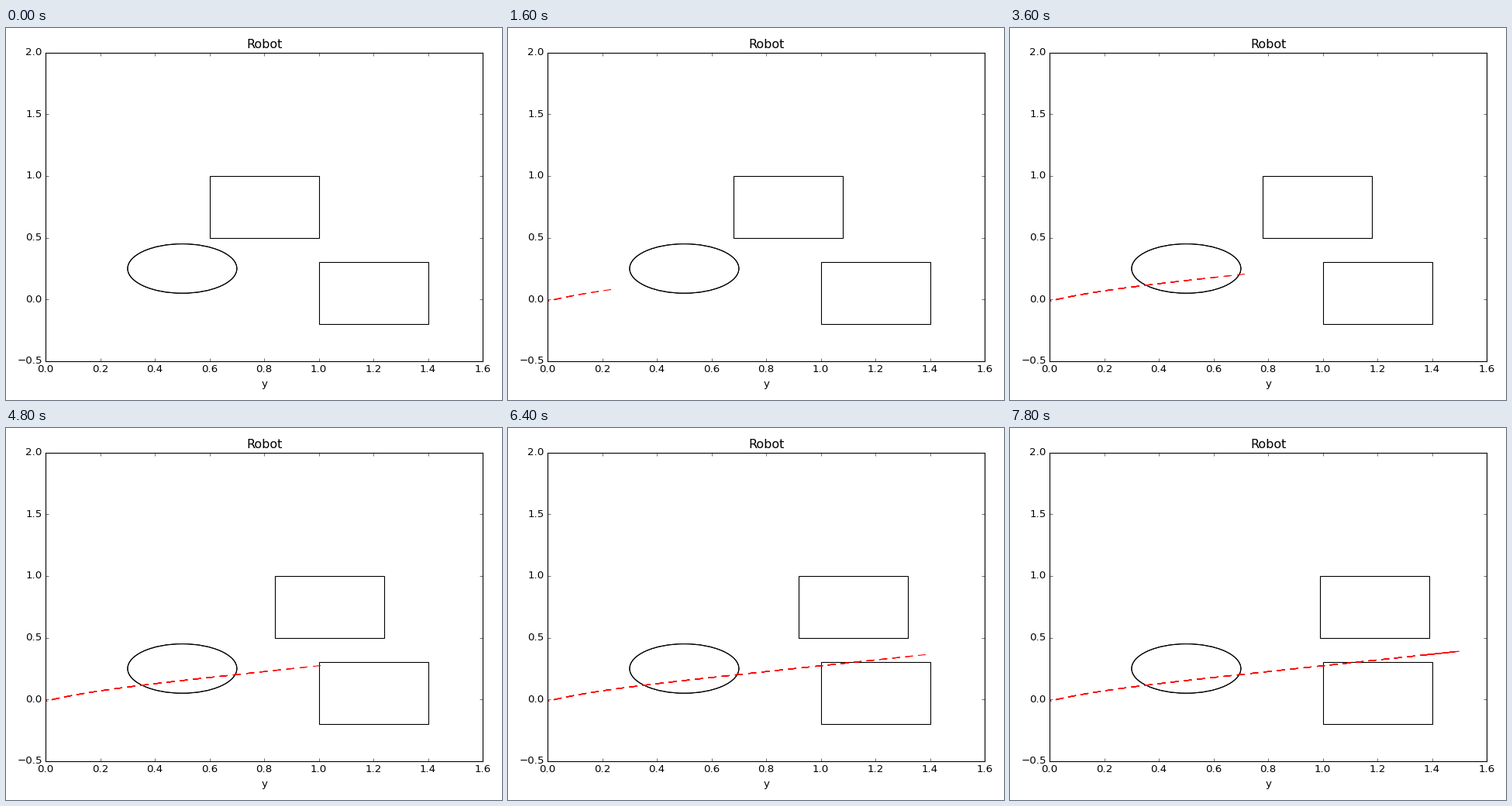
A matplotlib script for the animation above (8000 ms loop, 640 by 480 pixels).

```python
import matplotlib.pyplot as plt
import numpy as np
from matplotlib.animation import FuncAnimation
from matplotlib.collections import LineCollection
from matplotlib.patches import Circle, Rectangle

W, H, DPI = 640, 480, 80
FRAMES, INTERVAL = 40, 200
BODY = 0.0285      # robot length along x
LAYERS = 9         # repeated strokes darken the older marks

plt.style.use("classic")
plt.rcParams["font.family"] = "DejaVu Sans"

fig = plt.figure(figsize=(W / DPI, H / DPI), dpi=DPI, facecolor="white")
ax = fig.add_axes([51.2 / W, 1 - 429.8 / H, 563.9 / W, 398 / H])
ax.set_xlim(0, 1.6)
ax.set_ylim(-0.5, 2)
ax.set_title("Robot")
ax.set_xlabel("y")


def outline(patch):
    patch.set(facecolor="none", edgecolor="black", linewidth=1)
    return ax.add_patch(patch)


for _ in range(2):
    outline(Circle((0.5, 0.25), 0.2))
outline(Rectangle((1.0, -0.2), 0.4, 0.5))
mover = outline(Rectangle((0.6, 0.5), 0.4, 0.5))


def path_y(x):
    return 0.39 + 0.2345 * (x - 1.5) - 0.0527 * np.exp(-x / 0.165)


# Steady cruise, then braking towards the goal
KNOT_STEP = [3, 8, 14, 18, 24, 32, 33, 34, 35, 36, 37, 38, 39]
KNOT_X = [-0.009, 0.218, 0.505, 0.700, 0.993, 1.370, 1.396,
          1.418, 1.438, 1.455, 1.469, 1.478, 1.486]


def body(step):
    x = np.interp(step, KNOT_STEP, KNOT_X)
    ends = np.array([x - BODY / 2, x + BODY / 2])
    return np.column_stack([ends, path_y(ends)])


marks = {step: body(step) for step in range(3, FRAMES)}
trail = LineCollection([], colors="red", linewidths=1, zorder=2)
ax.add_collection(trail, autolim=False)


def draw(i):
    mover.set_x(0.6 + 0.01 * i)
    strokes = []
    for step in range(3, i + 1):
        strokes += [marks[step]] * min(i - step + 1, LAYERS)
    trail.set_segments(strokes)
    return mover, trail


anim = FuncAnimation(fig, draw, frames=FRAMES, interval=INTERVAL,
                     init_func=lambda: draw(0), repeat=True, repeat_delay=0)
plt.show()
```
